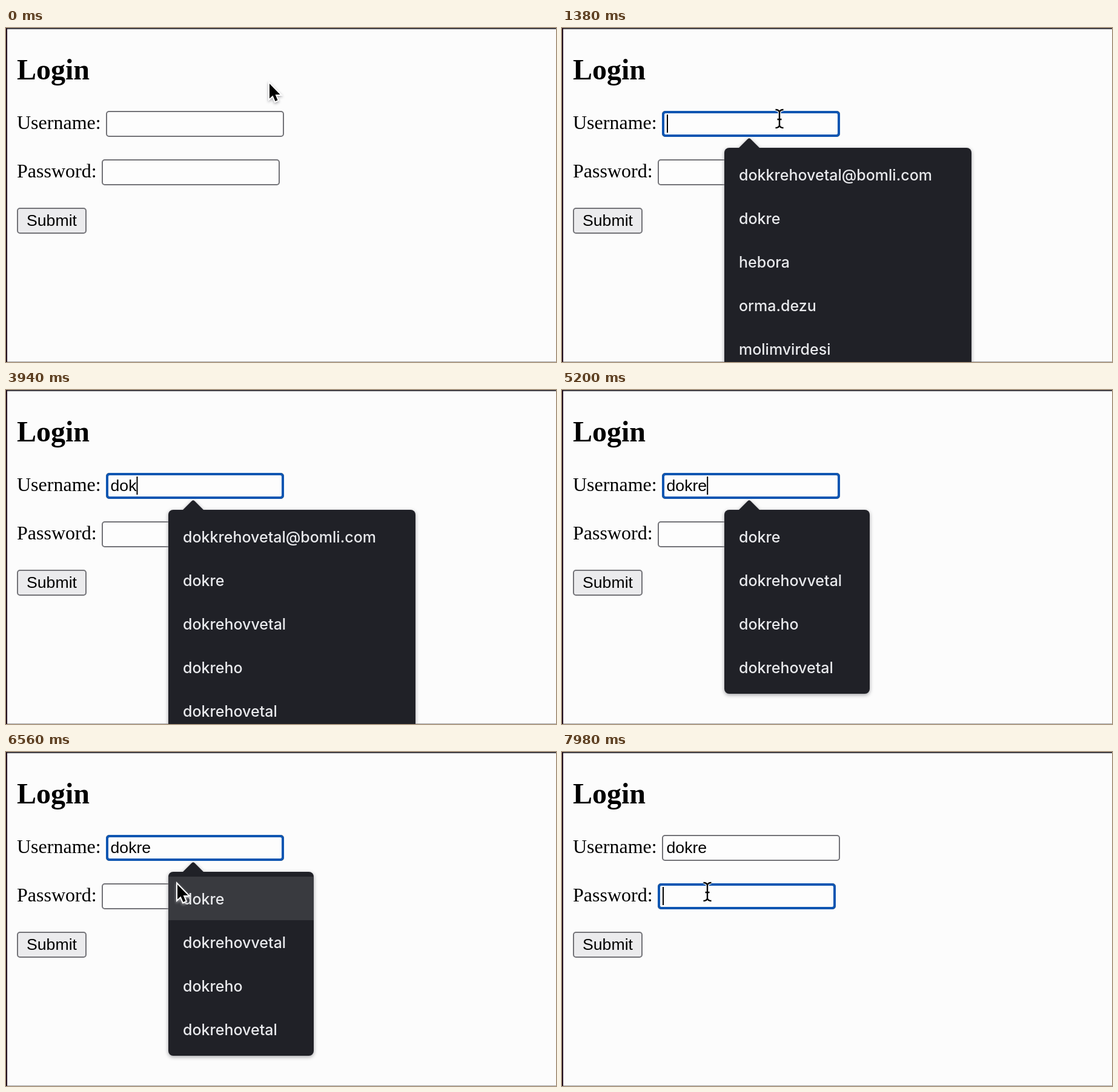
An HTML page for the animation above (8 s loop, 908 by 552 pixels).

```html
<!DOCTYPE html>
<html lang="en">
<head>
<meta charset="utf-8">
<title>Login form</title>
<style>
  html, body { margin: 0; width: 100%; height: 100%; overflow: hidden; background: #fcfcfc; }
  svg { display: block; width: 908px; height: 552px; }
  text { white-space: pre; }
  .label { font: 32px "Liberation Serif", serif; }
  .title { font: bold 48px "Liberation Serif", serif; }
  .control { font: 26.67px "Liberation Sans", sans-serif; }
  .field { fill: #fdfdfd; stroke: #737378; stroke-width: 2; }
  .focus { fill: none; stroke: #0d56b2; stroke-width: 4; }
  #popup { filter: drop-shadow(0 2px 3px #a0a0a4); }
  #popup text { font: 500 25px Inter, sans-serif; fill: #e8e9ec; }
  .panel { fill: #202127; }
  #arrow { stroke: #fdfdfd; stroke-width: 4; paint-order: stroke; filter: drop-shadow(0 2px 2px #a8a8ac); }
  #beam path { fill: none; stroke: #000; stroke-width: 2.4; }
  #beam .halo { stroke: #fdfdfd; stroke-width: 5; }
</style>
</head>
<body>
<svg viewBox="0 0 908 552">
  <rect width="908" height="552" fill="#fcfcfc"/>
  <rect y="551" width="908" height="1" fill="#a8a8aa"/>
  <rect width="908" height="2" fill="#424046"/>
  <rect width="2" height="552" fill="#24101f"/>

  <text class="title" x="18" y="85">Login</text>
  <text class="label" x="18" y="167">Username:</text>
  <text class="label" x="18" y="247">Password:</text>

  <rect class="field" x="166" y="138" width="292" height="41" rx="4"/>
  <rect class="field" x="159" y="218" width="292" height="41" rx="4"/>
  <rect id="userFocus" class="focus" x="167" y="139" width="290" height="39" rx="4"/>
  <rect id="passFocus" class="focus" x="160" y="219" width="290" height="39" rx="4"/>
  <text id="typed" class="control" x="172.5" y="167"></text>
  <rect id="caret" width="2" height="30"/>

  <rect x="19" y="298" width="113" height="41" rx="4" fill="#ebebed" stroke="#737378" stroke-width="2"/>
  <text class="control" x="34" y="327">Submit</text>

  <g id="popup">
    <path class="panel" d="M291 199L306 184Q309 180.500 312 184L327 199Z"/>
    <rect id="panel" class="panel" x="268" y="198" rx="8"/>
    <rect id="hover" x="268" y="206" height="72" fill="#393a3f"/>
    <g id="rows"></g>
  </g>

  <path id="arrow" d="M0 0V24.500L5.500 19.500L9.500 29L13.500 27.300L9.600 18H17.500Z"/>
  <g id="beam"></g>
</svg>
<script>
const LOOP = 8000;
const NAME = "dokre";
const KEY_TIMES = [2740, 3180, 3640, 4080, 4800];
const FOCUS_USER = 960, FOCUS_PASS = 7900, POINTER_BACK = 5700;

const RECENT = ["dokkrehovetal@bomli.com", "dokre", "hebora", "orma.dezu", "molimvirdesi"];
const MATCHES = ["dokre", "dokrehovvetal", "dokreho", "dokrehovetal"];

// Pointer moves: start, end, from, to
const MOVES = [
  [40, 760, [435, 92], [359, 150]],
  [POINTER_BACK, 6300, [359, 150], [283, 219]],
  [7680, 7840, [283, 219], [240, 231]],
];

const $ = id => document.getElementById(id);
const show = (id, on) => $(id).style.display = on ? "" : "none";
const inside = ([x, y], left, top, right, bottom) =>
  x >= left && x <= right && y >= top && y <= bottom;

const beamShape = "M-6.500 -15Q-1 -15 0 -11Q1 -15 6.500 -15M0 -11V11M-6.500 15Q-1 15 0 11Q1 15 6.500 15M-3.500 1H3.500";
$("beam").innerHTML = `<path class="halo" d="${beamShape}"/><path d="${beamShape}"/>`;

function pointerAt(t) {
  let point = MOVES[0][2];
  for (const [start, end, from, to] of MOVES) {
    if (t < start) break;
    const p = Math.min(1, (t - start) / (end - start));
    const eased = p * p * (3 - 2 * p);
    point = from.map((v, i) => v + (to[i] - v) * eased);
  }
  return point;
}

function suggestions(count) {
  if (count === 0) return RECENT;
  return count < 4 ? [RECENT[0], ...MATCHES] : MATCHES;
}

function drawPopup(count) {
  const items = suggestions(count);
  const width = count < 4 ? 408 : 240;
  $("panel").setAttribute("width", width);
  $("panel").setAttribute("height", 16 + 72 * items.length);
  $("hover").setAttribute("width", width);
  $("rows").innerHTML = items
    .map((item, i) => `<text x="292" y="${252 + 72 * i}">${item}</text>`).join("");
}

function caretVisible(t, count, hovering) {
  if (t < FOCUS_USER || hovering) return false;
  if (t >= FOCUS_PASS) return true;
  if (count === 0) return t < FOCUS_USER + 500;
  return (t - KEY_TIMES[count - 1]) % 1000 < 500;
}

let shownCount = -1;

function draw(t) {
  const count = KEY_TIMES.filter(time => t >= time).length;
  const userActive = t >= FOCUS_USER && t < FOCUS_PASS;
  const passActive = t >= FOCUS_PASS;

  if (count !== shownCount) {
    $("typed").textContent = NAME.slice(0, count);
    drawPopup(count);
    shownCount = count;
  }

  const point = pointerAt(t);
  const hovering = userActive && count === NAME.length && inside(point, 268, 206, 508, 278);
  const overPopup = userActive && inside(point, 268, 198, 508, 502);
  const overField = !overPopup &&
    (inside(point, 165, 137, 459, 180) || inside(point, 158, 217, 452, 260));
  const pointerShown = t < KEY_TIMES[0] || t >= POINTER_BACK;

  show("popup", userActive);
  show("hover", hovering);
  show("userFocus", userActive);
  show("passFocus", passActive);

  show("caret", caretVisible(t, count, hovering));
  const textWidth = count ? $("typed").getComputedTextLength() : 0.5;
  $("caret").setAttribute("x", passActive ? 166 : 172.5 + textWidth);
  $("caret").setAttribute("y", passActive ? 223 : 143);

  show("arrow", pointerShown && !overField);
  show("beam", pointerShown && overField);
  for (const id of ["arrow", "beam"]) $(id).setAttribute("transform", `translate(${point})`);
}

const begin = performance.now();
function tick() {
  draw((performance.now() - begin) % LOOP);
  requestAnimationFrame(tick);
}
tick();
</script>
</body>
</html>
```
